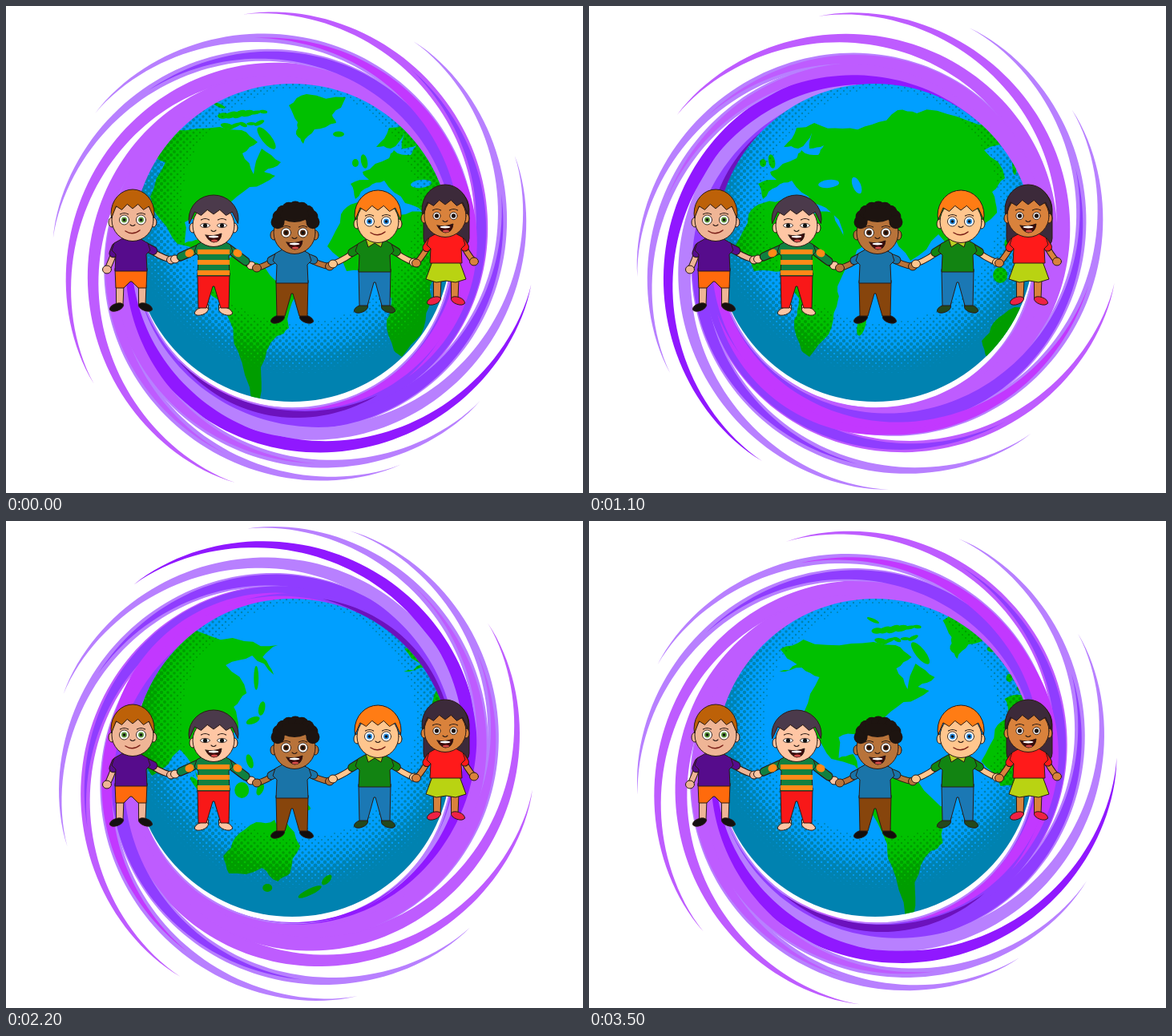
An HTML page with a canvas that plays this animation: 720 px wide and 608 px high, repeating every 3.6 s.

```html
<!DOCTYPE html>
<html lang="en">
<head>
<meta charset="utf-8">
<title>Children around the world</title>
<style>
html, body { margin: 0; width: 100%; height: 100%; overflow: hidden; background: #fff; }
canvas { display: block; }
</style>
</head>
<body>
<canvas id="stage" width="720" height="608"></canvas>
<script>
const W = 720, H = 608, STEP = 100, STEPS = 36, TAU = Math.PI * 2;
const ctx = document.getElementById('stage').getContext('2d');
const globe = { x: 357, y: 295.5, r: 198.5 };
const hub = { x: 358.5, y: 304 };
const WATER = '#009fff', LAND = '#00c000', MAP = 785, SCROLL = 19.9;

let seed = 7;
function rand(a = 0, b = 1) {
  seed = (seed * 16807) % 2147483647;
  return a + (b - a) * seed / 2147483647;
}

function layer(draw) {
  const c = document.createElement('canvas');
  c.width = W; c.height = H;
  draw(c.getContext('2d'));
  return c;
}

function poly(pts) {
  const p = new Path2D();
  pts.forEach(([x, y]) => p.lineTo(x, y));
  p.closePath();
  return p;
}

function oval(x, y, rx, ry = rx, a = 0) {
  const p = new Path2D();
  p.ellipse(x, y, rx, ry, a, 0, TAU);
  return p;
}

// ---- world map: a flat strip scrolling behind a round window ----
// Splits every side twice and nudges the new points, for a ragged coast.
function coast(flat, dx = 0) {
  let pts = [];
  for (let i = 0; i < flat.length; i += 2) pts.push([flat[i] + dx, flat[i + 1]]);
  for (let pass = 0; pass < 2; pass++) {
    pts = pts.flatMap(([x, y], i) => {
      const [u, v] = pts[(i + 1) % pts.length], k = rand(-.12, .12);
      return [[x, y], [(x + u) / 2 + (v - y) * k, (y + v) / 2 - (u - x) * k]];
    });
  }
  return poly(pts);
}

const lands = [
  // North America
  coast([240,188, 262,179, 241,160, 270,148, 330,153, 385,155, 405,170, 386,184, 400,210, 410,178, 434,195,
    413,207, 427,212, 395,226, 367,253, 345,266, 348,283, 338,266, 314,270, 314,296, 332,291, 338,310,
    358,323, 305,297, 285,268, 271,238, 290,195, 268,183], -91),
  // South America
  coast([352,322, 376,311, 412,325, 453,360, 443,402, 428,412, 408,451, 407,490, 396,492, 379,430, 370,395,
    347,362, 340,340], -90),
  // Greenland
  coast([353,124, 375,110, 424,114, 407,136, 412,146, 385,154, 371,172, 362,160, 364,145]),
  // Africa
  coast([436,246, 467,240, 490,261, 524,258, 541,295, 555,299, 529,350, 528,375, 518,410, 494,438, 484,430,
    475,392, 481,365, 461,331, 425,331, 401,300, 418,260]),
  // Europe and Asia
  coast([430,222, 453,217, 445,207, 478,190, 484,180, 505,186, 512,174, 494,178, 497,158, 480,178, 462,176,
    478,152, 500,146, 535,153, 572,148, 604,130, 628,134, 678,138, 735,150, 777,155, 758,170, 772,192,
    745,168, 712,180, 738,215, 722,232, 728,258, 692,282, 695,300, 674,304, 682,331, 655,285, 620,318,
    600,278, 566,272, 573,292, 543,312, 519,256, 498,246, 472,218, 453,226, 436,241]),
  // Australia
  coast([350,418, 365,395, 391,376, 414,373, 421,389, 427,373, 446,406, 433,440, 418,450, 398,433, 357,440], 359)
];
[
  [415,160,7,3.5,0], [436,196,4,5,0], [447,194,4,9,-.2], [559,398,5,14,.25], [325,165,17,6,.9],
  [750,196,3,15,0], [757,234,4,9,.2], [746,249,9,4,-.4], [742,300,4,9,-.3], [680,333,18,4,.85],
  [732,336,9,10,0], [755,335,4,8,.4], [797,352,22,6,.35], [838,448,8,4,-.8], [817,463,16,4,-.45], [764,458,6,5,0]
].forEach(o => lands.push(oval(...o)));
// arctic islands
for (let i = 0; i < 12; i++) {
  lands.push(oval(266 + i * 5, 124 + (i * 13) % 27, rand(5, 9), rand(2, 4), rand(-.5, .5)));
}
const lakes = [oval(518, 222, 13, 5, -.1), oval(553, 224, 5, 11, -.4)];

// halftone shade growing towards the rim
const shade = layer(g => {
  g.fillStyle = 'rgb(255,209,176)';
  g.beginPath();
  for (let row = 0; row < 102; row++) {
    for (let x = 150 + (row % 2) * 4; x < 565; x += 8) {
      const y = 90 + row * 4;
      const k = (Math.hypot(x - 365, y - 250) - 146) / 70;
      if (k <= 0) continue;
      const r = .9 + Math.min(k, 1) * 3.2;
      g.moveTo(x + r, y);
      g.arc(x, y, r, 0, TAU);
    }
  }
  g.fill();
});

function drawGlobe(n) {
  ctx.save();
  ctx.beginPath();
  ctx.arc(globe.x, globe.y, globe.r, 0, TAU);
  ctx.clip();
  ctx.fillStyle = WATER;
  ctx.fillRect(0, 0, W, H);
  for (const lap of [0, 1]) {
    ctx.save();
    ctx.translate(lap * MAP - n * SCROLL, 0);
    ctx.fillStyle = LAND;
    lands.forEach(p => ctx.fill(p));
    ctx.fillStyle = WATER;
    lakes.forEach(p => ctx.fill(p));
    ctx.restore();
  }
  ctx.globalCompositeOperation = 'multiply';
  ctx.drawImage(shade, 0, 0);
  ctx.restore();
}

// ---- swirl: tapered spirals, all turning together ----
const LILAC = '#b880ff', ORCHID = '#be5cff', VIOLET = '#8f3dff', PURPLE = '#9018ff', PINK = '#c238ff', DEEP = '#6c12bd';
const SWEEP = 260;
// tip angle, colour near the tip, colour further in
const spirals = [
  [258, ORCHID, VIOLET], [300, LILAC, VIOLET], [337, LILAC, LILAC], [8.4, PURPLE, PURPLE], [39, LILAC, ORCHID],
  [63.5, LILAC, ORCHID], [104, ORCHID, ORCHID], [146, ORCHID, ORCHID], [182.7, LILAC, VIOLET], [214.5, LILAC, PINK]
];
const radius = d => 195 + 105 * Math.exp(-Math.pow(d / 100, 1.3));
const girth = d => 24 * (1 - Math.exp(-d / 80)) * Math.min(1, (SWEEP - d) / 100);
const taper = (d, end) => Math.sin(Math.PI * d / end);

function ribbon(tip, from, to, mid, width) {
  const outer = [], inner = [];
  for (let d = from; d <= to; d += 2) {
    const a = (tip + d) * Math.PI / 180, c = Math.cos(a), s = Math.sin(a);
    const r = mid(d), w = width(d) / 2;
    outer.push([c * (r + w), s * (r + w)]);
    inner.unshift([c * (r - w), s * (r - w)]);
  }
  return poly(outer.concat(inner));
}

const swirl = [
  ...spirals.map(([a, tint]) => [tint, ribbon(a, 0, SWEEP, radius, girth)]),
  ...spirals.map(([a, , tint]) => [tint, ribbon(a, 45, 235, radius, d => 17 * taper(d - 45, 190))]),
  [DEEP, ribbon(60, 0, 76, d => 210 - d * .14, d => 9 * taper(d, 76))],
  [PINK, ribbon(318, 0, 90, d => 232 - d * .2, d => 11 * taper(d, 90))]
];

function drawSwirl(n) {
  ctx.save();
  ctx.translate(hub.x, hub.y);
  ctx.rotate(n * TAU / STEPS);
  for (const [tint, path] of swirl) {
    ctx.fillStyle = tint;
    ctx.fill(path);
  }
  ctx.restore();
}

// ---- children: one figure, varied by its settings ----
const INK = '#2a1a14';
const children = [
  { x: 156, head: [158, 267], top: 292, waist: 331, hem: 352, foot: 376, stance: 18, hands: [[126, 329], [206, 317]],
    skin: '#efb596', shirt: '#560c8c', legs: '#ff6a0c', shoe: '#15100f', hair: '#bd6108', cap: [27, 30], iris: '#5d9a3c' },
  { x: 259, head: [259, 274], top: 294, waist: 337, hem: 377, foot: 381, stance: 15, hands: [[211, 316], [306, 324]],
    skin: '#ffc6a4', shirt: '#108040', legs: '#f81818', shoe: '#ffc6a4', hair: '#4b3a4b', cap: [31, 30],
    stripes: '#ff8a18', squint: true, grin: true },
  { x: 357, head: [360, 283], top: 305, waist: 346, hem: 387, foot: 391, stance: 18, hands: [[313, 327], [404, 325]],
    skin: '#b8733a', shirt: '#1a74a8', legs: '#87450c', shoe: '#120d0c', hair: '#1d1410', curls: true, iris: '#4a2410', grin: true },
  { x: 460, head: [464, 269], top: 293, waist: 332, hem: 374, foot: 378, stance: 17, hands: [[408, 322], [509, 320]],
    skin: '#ffc68e', shirt: '#128412', legs: '#1b78b4', shoe: '#24481c', hair: '#ff7c14', cap: [29, 31],
    collar: '#b8d020', iris: '#2888d8' },
  { x: 549, head: [548, 262], top: 285, waist: 321, hem: 345, foot: 368, stance: 15, hands: [[512, 321], [584, 319]],
    skin: '#d9823c', shirt: '#ff1a1a', legs: '#b9d312', shoe: '#ee2244', hair: '#3c2a3a', cap: [29, 31],
    skirt: true, iris: '#2a1208', grin: true }
];

function drawChild(g, k) {
  const { x, top, waist, hem, foot, stance } = k, [hx, hy] = k.head;
  const paint = (tint, p, line = 1) => {
    g.fillStyle = tint;
    g.fill(p);
    if (line) { g.strokeStyle = INK; g.lineWidth = line; g.stroke(p); }
  };
  const mirror = half => poly([...half, ...half.map(([dx, y]) => [-dx, y]).reverse()].map(([dx, y]) => [x + dx, y]));
  const curve = (tint, w, ax, ay, bx, by, cx, cy) => {
    g.beginPath();
    g.moveTo(ax, ay);
    g.quadraticCurveTo(bx, by, cx, cy);
    g.strokeStyle = tint; g.lineWidth = w; g.stroke();
  };

  if (k.skirt) {
    const back = new Path2D();
    back.roundRect(hx - 27, hy - 36, 57, 76, [28, 28, 12, 12]);
    paint(k.hair, back);
  }

  // arms: bare forearm, then the sleeve over its upper part
  k.hands.forEach(([u, v], i) => {
    const side = i ? 1 : -1, sx = x + side * 19, sy = top + 9;
    const ex = (sx + u) / 2, ey = (sy + v) / 2 + 4;
    curve(INK, 8, sx, sy, ex, ey, u, v);
    curve(k.skin, 6, sx, sy, ex, ey, u, v);
    paint(k.skin, oval(u, v, 5.5, 5));
    const reach = k.stripes ? .75 : .28, mx = sx + (u - sx) * reach, my = sy + (v - sy) * reach;
    curve(INK, 11, sx, sy, sx, sy, mx, my);
    curve(k.shirt, 9, sx, sy, sx, sy, mx, my);
    if (k.stripes) curve(k.stripes, 9, sx + side * 10, sy + 5, sx + side * 11, sy + 6, sx + side * 12, sy + 6);
  });

  // legs, feet, clothes
  for (const side of [-1, 1]) {
    paint(k.skin, mirror([[0, 0]]), 0);
    const lx = x + side * (stance - 4);
    paint(k.skin, poly([[lx - 5, hem - 4], [lx + 5, hem - 4], [lx + 4, foot - 3], [lx - 4, foot - 3]]));
    paint(k.shoe, oval(x + side * stance, foot, 9, 4.5, side * .35));
  }
  if (k.skirt) paint(k.legs, mirror([[17, waist - 2], [25, hem - 4], [12, hem], [0, hem - 2]]));
  else paint(k.legs, mirror([[20, waist - 3], [19, hem], [9, hem], [1, waist + 13]]));
  paint(k.shirt, mirror([[12, top - 1], [21, top + 4], [24, top + 13], [19, top + 18], [20, waist]]));
  if (k.stripes) {
    g.fillStyle = k.stripes;
    for (let y = top + 10; y < waist - 4; y += 13) g.fillRect(x - 20, y, 40, 6);
  }
  if (k.collar) paint(k.collar, mirror([[11, top - 2], [8, top + 8], [0, top + 3]]));

  // head
  for (const side of [-1, 1]) paint(k.skin, oval(hx + side * 26, hy + 3, 4, 6));
  paint(k.skin, oval(hx, hy, 26, 26.5));

  if (k.curls) {
    g.fillStyle = k.hair;
    for (let a = 0; a <= 8; a++) {
      const t = Math.PI * (1.02 + a * .12);
      g.fill(oval(hx + 1 + Math.cos(t) * 22, hy - 12 + Math.sin(t) * 19, 8.5));
    }
    g.fill(oval(hx, hy - 22, 18, 9));
  } else {
    const [rx, ry] = k.cap, cy = hy - 8, tufts = 8, cap = new Path2D();
    cap.ellipse(hx, cy, rx, ry, 0, Math.PI * .94, Math.PI * 2.06);
    for (let i = 1; i < tufts; i++) {
      cap.lineTo(hx + rx * (1 - 2 * i / tufts), cy - (i % 2 ? 7 : 1) - 5 * Math.sin(Math.PI * i / tufts));
    }
    cap.closePath();
    paint(k.hair, cap);
  }

  for (const side of [-1, 1]) {
    const ex = hx + side * 10.5, ey = hy;
    curve(INK, 1.2, ex - 5, ey - 7, ex, ey - 10, ex + 5, ey - 7);
    if (k.squint) {
      paint('#fff', oval(ex, ey, 6, 2.6), .8);
      g.fillStyle = '#111';
      g.fill(oval(ex, ey, 2.6));
    } else {
      const r = k.skirt ? 4.6 : 6;
      paint('#fff', oval(ex, ey, r), .9);
      paint(k.iris, oval(ex, ey, r * .58), 0);
      paint('#111', oval(ex, ey, r * .3), 0);
    }
  }
  curve(INK, 1.1, hx - 3, hy + 6, hx, hy + 9, hx + 3, hy + 6);
  if (k.grin) {
    const m = new Path2D();
    m.moveTo(hx - 10, hy + 12);
    m.quadraticCurveTo(hx, hy + 14, hx + 10, hy + 10);
    m.quadraticCurveTo(hx + 9, hy + 21, hx, hy + 21);
    m.quadraticCurveTo(hx - 6, hy + 20, hx - 10, hy + 12);
    paint('#3a0a0a', m);
    paint('#fff', oval(hx, hy + 14, 6.5, 1.4), 0);
    paint('#d84a48', oval(hx + 1, hy + 19, 4, 1.6), 0);
  } else {
    curve('#7a2018', 1.5, hx - 9, hy + 14, hx, hy + 20, hx + 9, hy + 13);
  }
}

const kids = layer(g => {
  g.lineJoin = g.lineCap = 'round';
  children.forEach(k => drawChild(g, k));
});

function draw(ms) {
  const n = Math.floor(ms / STEP) % STEPS;
  ctx.fillStyle = '#fff';
  ctx.fillRect(0, 0, W, H);
  drawSwirl(n);
  drawGlobe(n);
  ctx.drawImage(kids, 0, 0);
}

const begin = performance.now();
function tick() {
  draw(performance.now() - begin);
  requestAnimationFrame(tick);
}
tick();
</script>
</body>
</html>
```
